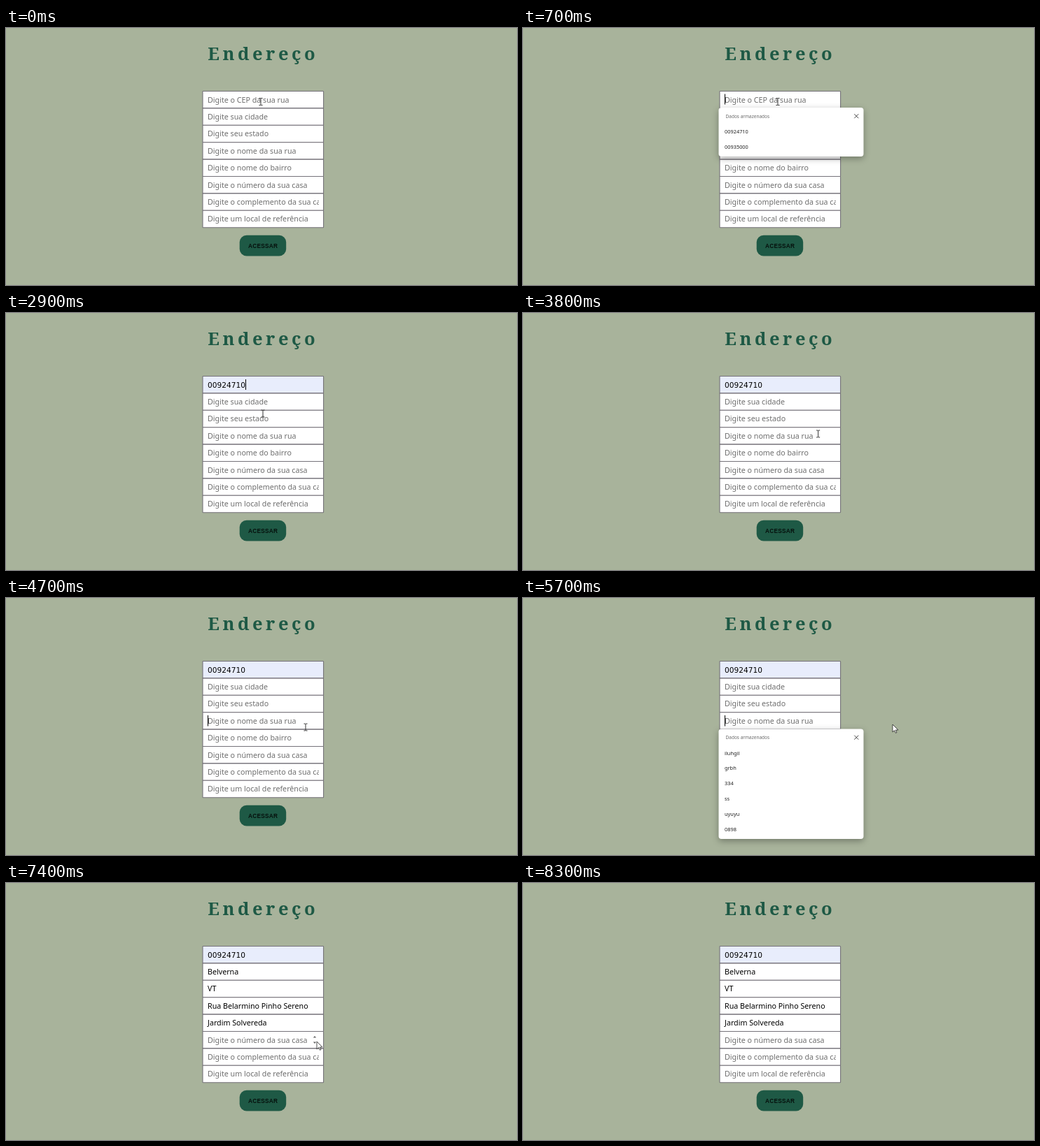
Animation, 730 px wide and 368 px high, one loop 9000 ms. Source, as an HTML page:

```html
<!DOCTYPE html>
<html lang="pt-BR">
<head>
<meta charset="utf-8">
<title>Endereço</title>
<style>
  html, body { margin: 0; width: 100%; height: 100%; overflow: hidden; background: #a8b39b; }
  svg { display: block; width: 730px; height: 368px; }
  text { font-family: "Noto Sans", sans-serif; }
  .title { font: bold 25.5px "Noto Serif", serif; letter-spacing: 4.5px; fill: #1e5945; }
  .button { font: bold 8.3px "Liberation Sans", Arial, sans-serif; letter-spacing: .25px; fill: #06110d; }
  .box { fill: #fff; stroke: #757279; stroke-width: 1.1; }
  .entry { font-size: 10.7px; fill: #6e6e6e; }
  .filled .entry { fill: #000; }
  .filled .code { font-family: "DejaVu Sans", sans-serif; font-size: 10.6px; }
  .auto .box { fill: #e8edfc; }
  .popup { fill: #fff; filter: drop-shadow(0 3px 5px rgba(0, 0, 0, .32)); }
  .heading { font-size: 6.5px; fill: #6a6a6a; }
  .item { font-size: 7.4px; fill: #222; }
  .caret { stroke: #000; }
</style>
</head>
<body>
<svg id="stage" viewBox="0 0 730 368">
  <defs><clipPath id="inner"><rect x="286" y="88" width="161" height="200"/></clipPath></defs>
  <text class="title" x="288.3" y="46">Endereço</text>
  <g id="form"></g>
  <rect x="333.7" y="296.7" width="66.5" height="29.7" rx="10" fill="#1e5945"/>
  <text class="button" x="346" y="314.6">ACESSAR</text>
  <path id="spinner" d="M438.8 221.5h4.4l-2.2-2.6zM438.8 227.5h4.4l-2.2 2.6z" fill="#666"/>
  <path id="codeCaret" class="caret" d="M342.5 95v15"/>
  <path id="emptyCaret" class="caret" d="M288.5 94.5v15"/>
  <path id="streetCaret" class="caret" d="M288.5 168v15.5"/>
  <g id="popups"></g>
  <path id="arrow" d="M0 0V11L2.6 8.6 4.4 12.3 6 11.5 4.3 8H8Z" fill="#fff" stroke="#222" stroke-width=".8"/>
  <path id="beam" d="M-2.5-5H-.5L0-4.5.5-5H2.5M0-4.5V4.5M-2.5 5H-.5L0 4.5.5 5H2.5" fill="none" stroke="#333"/>
</svg>
<script>
const LOOP = 9000, STEP = 100;
const ROW_TOP = 90.5, ROW_HEIGHT = 24.4;
const CODES = ["00924710", "00935000"];

// placeholder, value, time the value appears
const FIELDS = [
  ["Digite o CEP da sua rua", CODES[0], 2300],
  ["Digite sua cidade", "Belverna", 6000],
  ["Digite seu estado", "VT", 6000],
  ["Digite o nome da sua rua", "Rua Belarmino Pinho Sereno", 6000],
  ["Digite o nome do bairro", "Jardim Solvereda", 6000],
  ["Digite o número da sua casa"],
  ["Digite o complemento da sua casa"],
  ["Digite um local de referência"]
];

// time, x, y of the pointer's hot spot
const PATH = [
  [2000, 364, 105.5], [2100, 360, 126], [2500, 366, 142], [2800, 366, 142],
  [2900, 367, 144], [3300, 368, 146], [3700, 404, 170], [4000, 457, 179],
  [4300, 440, 183], [4500, 428, 185], [5300, 428, 185], [5500, 485, 184],
  [5700, 528, 181], [6800, 528, 181], [7100, 486, 212], [7400, 444, 227],
  [7500, 432, 160], [7700, 389, -1], [7900, 389, -1], [8200, 349, -2]
];

const byId = id => document.getElementById(id);

function add(parent, tag, attrs, text = "") {
  const node = document.createElementNS("http://www.w3.org/2000/svg", tag);
  for (const key in attrs) node.setAttribute(key, attrs[key]);
  node.textContent = text;
  return parent.appendChild(node);
}

const rows = FIELDS.map(([hint], i) => {
  const top = ROW_TOP + i * ROW_HEIGHT;
  const group = add(byId("form"), "g", {});
  add(group, "rect", { class: "box", x: 281, y: top, width: 172.6, height: ROW_HEIGHT, rx: .5 });
  const holder = add(group, "g", { "clip-path": "url(#inner)" });
  const entry = add(holder, "text", { class: i ? "entry" : "entry code", x: 288, y: top + 16 }, hint);
  return { group, entry };
});

function makePopup(top, height, items) {
  const group = add(byId("popups"), "g", {});
  add(group, "rect", { class: "popup", x: 279.5, y: top, width: 207, height, rx: 4 });
  const hover = add(group, "rect", { x: 280, y: top + 23, width: 206, height: 22, fill: "#efefef", visibility: "hidden" });
  add(group, "text", { class: "heading", x: 289.5, y: top + 14.5 }, "Dados armazenados");
  add(group, "path", { d: `M473.3 ${top + 9.2}l6 6m0-6l-6 6`, stroke: "#333", "stroke-width": .9 });
  items.forEach((item, i) => add(group, "text", { class: "item", x: 288, y: top + 37 + i * 21.9 }, item));
  return { group, hover };
}

const codePopup = makePopup(114, 70, CODES);
const streetPopup = makePopup(187.5, 157.5, ["iluhgil", "grbh", "334", "ss", "uyuyu", "0898"]);

const within = (t, start, end) => t >= start && t < end;
const show = (node, on) => node.setAttribute("visibility", on ? "visible" : "hidden");

function pointerAt(t) {
  const next = PATH.findIndex(point => point[0] > t);
  if (next === 0) return PATH[0].slice(1);
  if (next < 0) return PATH[PATH.length - 1].slice(1);
  const [t0, x0, y0] = PATH[next - 1], [t1, x1, y1] = PATH[next];
  const k = (t - t0) / (t1 - t0);
  return [x0 + (x1 - x0) * k, y0 + (y1 - y0) * k];
}

function drawPointer(t, codeOpen) {
  const [x, y] = pointerAt(t);
  const row = Math.floor((y - ROW_TOP) / ROW_HEIGHT);
  const overForm = within(x, 281, 454) && within(row, 0, FIELDS.length);
  const overSpinner = row === 5 && x > 436;
  const isBeam = overForm && !overSpinner && !(codeOpen && y > 114);
  const visible = t < 8300;
  for (const id of ["arrow", "beam"]) {
    byId(id).setAttribute("transform", `translate(${x} ${y})`);
    show(byId(id), visible && (id === "beam") === isBeam);
  }
  show(byId("spinner"), overForm && row === 5);
}

function draw(t) {
  rows.forEach(({ group, entry }, i) => {
    const [hint, value, start] = FIELDS[i];
    const filled = value && t >= start;
    entry.textContent = filled ? value : hint;
    group.setAttribute("class", filled ? (i ? "filled" : "filled auto") : "");
  });

  const codeOpen = within(t, 500, 2900);
  show(codePopup.group, codeOpen);
  codePopup.group.setAttribute("opacity", Math.max(0, Math.min(1, (t - 400) / 300)));
  show(codePopup.hover, within(t, 2300, 2900));
  show(streetPopup.group, within(t, 4900, 5900));

  show(byId("emptyCaret"), within(t, 500, 1000));
  show(byId("codeCaret"), within(t, 2900, 3400) || within(t, 3900, 4400));
  show(byId("streetCaret"), within(t, 4600, 5100) || within(t, 5600, 5900));
  drawPointer(t, codeOpen);
}

const startTime = performance.now();
function tick() {
  const t = (performance.now() - startTime) % LOOP;
  draw(Math.floor(t / STEP) * STEP);
  requestAnimationFrame(tick);
}
tick();
</script>
</body>
</html>
```
